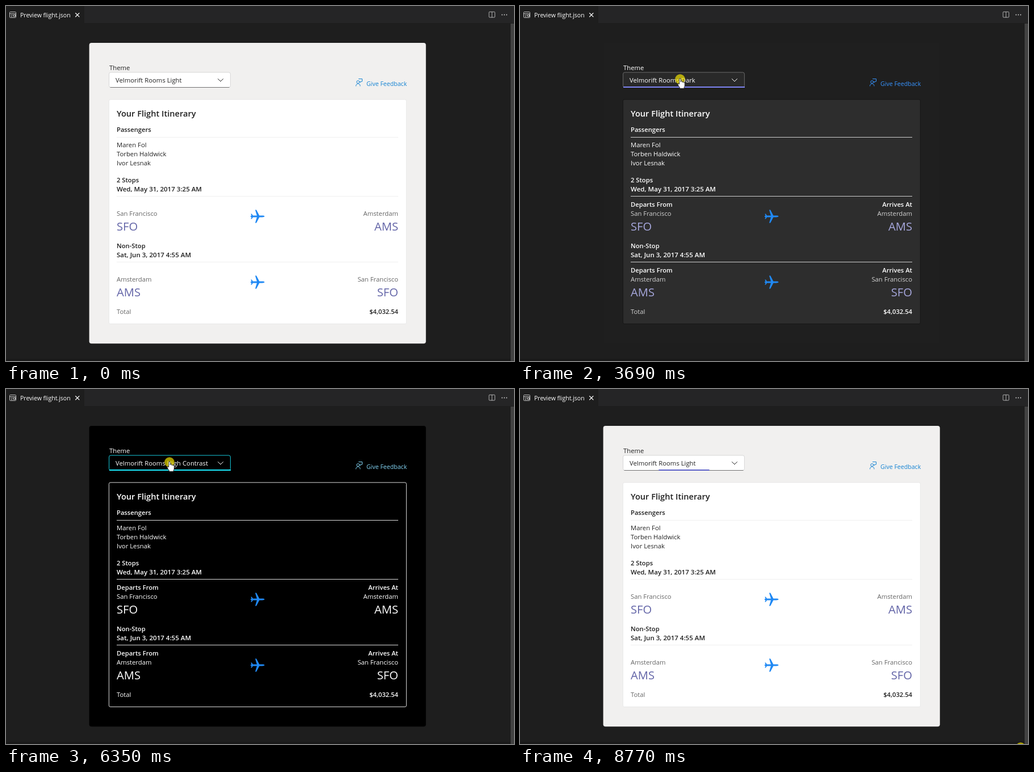
An HTML page for the animation above (8.82 s loop, 895 px wide and 626 px high).

```html
<!DOCTYPE html>
<html lang="en">
<head>
<meta charset="utf-8">
<title>Card preview</title>
<style>
  html, body { margin: 0; width: 100%; height: 100%; overflow: hidden; background: #1e1e1e; }
  svg { display: block; font-family: "Open Sans", "Noto Sans", sans-serif; font-size: 11.3px; }
  .light {
    --panel: #f1f0ef; --card: #fff; --edge: #e6e6e6; --text: #242424; --bold: #1f1f1f; --subtle: #666;
    --label: #fff; --accent: #6264a7; --rule: #ededed; --link: #1583d3; --field: #fff; --border: #d1d1d1;
    --base: #616161; --over: #b3b3b3; --focus: #5b5fc7; --list: #fff; --listEdge: #eee;
    --item: #f5f5f5; --press: #e0e0e0; --itemText: #242424;
  }
  .dark {
    --panel: #1f1f1f; --card: #2d2d2d; --edge: #141414; --text: #fff; --bold: #fff; --subtle: #d2d2d2;
    --label: #fff; --accent: #a6a7dc; --rule: #e8e8e8; --link: #3794ff; --field: #292929; --border: #666;
    --base: #adadad; --over: #757575; --focus: #7f85f5; --list: #292929; --listEdge: #333;
    --item: #3d3d3d; --press: #1f1f1f; --itemText: #fff;
  }
  .contrast {
    --panel: #000; --card: #000; --edge: #fff; --text: #fff; --bold: #fff; --subtle: #fff;
    --label: #fff; --accent: #fff; --rule: #fff; --link: #83d5f5; --field: #000; --border: #fff;
    --base: #fff; --over: #1aebff; --focus: #1aebff; --list: #000; --listEdge: #fff;
    --item: #1aebff; --press: #1aebff; --itemText: #000;
  }
  .text { fill: var(--text); font-weight: 450; }
  .bold { fill: var(--bold); font-weight: 600; font-size: 11.2px; }
  .date { fill: var(--bold); font-weight: 600; font-size: 11.55px; }
  .title { fill: var(--bold); font-weight: 600; font-size: 14.6px; }
  .label { fill: var(--label); font-weight: 600; font-size: 11.2px; }
  .subtle { fill: var(--subtle); font-weight: 450; }
  .item { font-weight: 450; }
  .code { fill: var(--accent); font-size: 20.2px; }
  .link { fill: var(--link); font-size: 10.6px; }
  .tab { fill: #fff; font-size: 10.5px; }
  .line { fill: none; stroke-linecap: round; stroke-linejoin: round; }
  .thin, #field, #base { stroke-width: .86; }
  #field { fill: var(--field); stroke: var(--border); }
  #base { stroke: var(--base); }
  .hover #field, .contrast.hover #base { stroke: var(--over); }
  #list { filter: drop-shadow(0 5px 7px rgba(0, 0, 0, .22)); }
</style>
</head>
<body>
<svg id="stage" width="895" height="626" viewBox="0 0 895 626" class="light"></svg>
<script>
const LOOP = 8820;
const THEMES = ['light', 'dark', 'contrast'];
const NAMES = ['Light', 'Dark', 'High Contrast'].map(n => 'Velmorift Rooms ' + n);
const ITEM_TOP = 148, ITEM_STEP = 30, ITEM_HEIGHT = 27;

// Bursts of motion: start, end, number of steps.
const BURSTS = [
  [0, 0, 1], [330, 1210, 13], [1280, 1480, 4], [1740, 2600, 13], [2730, 2730, 1], [2880, 3690, 13],
  [3820, 4420, 9], [4750, 5280, 8], [5820, 6680, 13], [6740, 7610, 13], [7680, 8490, 12], [8690, 8770, 2]
];
// Pointer path: time, x, y.
const PATH = [
  [330, 779, 606], [1210, 267, 123], [1280, 266, 106], [1480, 269, 123], [1870, 269, 123],
  [2600, 271, 193], [2930, 271, 193], [3690, 282, 129], [3860, 282, 129], [4420, 288, 227],
  [5820, 288, 227], [6320, 288, 129], [6460, 288, 129], [6960, 275, 162], [7175, 275, 162],
  [7610, 706, 425], [8490, 882, 632]
];
const SELECTED = [[0, 0], [2930, 1], [4820, 2], [7100, 0]];
const OPEN = [[1810, 2930], [3820, 4820], [6460, 7100]];
const CLICKS = [[1740, 1870], [2730, 2880], [3690, 3860], [4750, 4820], [6320, 6460], [6960, 7090], [8690, 8820]];
const ITEM_HELD = [[2730, 2930], [4750, 4820], [6960, 7100]];
// Underline: grow start and end, shrink start and end.
const UNDERLINE = [[2930, 3130, 3800, 3880], [4819, 5019, 6455, 6530], [7180, 7380, 8700, 8820]];

const text = (cls, x, y, s, end) =>
  `<text class="${cls}" x="${x}" y="${y}"${end ? ' text-anchor="end"' : ''}>${s}</text>`;
const rect = (x, y, w, h, attrs) => `<rect x="${x}" y="${y}" width="${w}" height="${h}" ${attrs}/>`;
const line = (d, stroke, width = 1) =>
  `<path class="line" d="${d}" stroke="${stroke}" stroke-width="${width}"/>`;
const rule = y => `<path class="thin" d="M195 ${y}H691" stroke="var(--rule)"/>`;

function plane(y) {
  const half = 'M12.5 0C12.5 .9 10.5 1.400 8.500 1.400H3.400L-1.800 11.500H-4L-1 1.400H-8L-10 4.600H-11.600L-10.400 1H-12V0Z';
  return `<g transform="translate(443 ${y})" fill="#2089f4"><path d="${half}"/>
    <path d="${half}" transform="scale(1 -1)"/></g>`;
}

function flight(y, stops, date, from, to) {
  return text('bold', 195, y, stops) + text('date', 195, y + 16, date) + rule(y + 24.5) +
    text('label', 195, y + 43, 'Departs From') + text('label', 691, y + 43, 'Arrives At', true) +
    text('subtle', 195, y + 59, from[0]) + text('subtle', 691, y + 59, to[0], true) +
    text('code', 195, y + 84.5, from[1]) + text('code', 691, y + 84.5, to[1], true) + plane(y + 60);
}

function windowBar() {
  const grey = '#c5c5c5';
  return rect(0, 0, 895, 626, 'fill="#1e1e1e"') + rect(138, 0, 757, 30, 'fill="#252526"') +
    rect(6.5, 10.5, 11, 10, `rx="1" fill="none" stroke="${grey}"`) +
    line('M7 13.5H17M9 16H12M9 18.5H11', grey) + rect(13.5, 15.5, 3, 3, `fill="none" stroke="${grey}"`) +
    text('tab', 25, 20, 'Preview flight.json') + line('M122.5 12.5l6.5 6.5m0-6.5l-6.5 6.5', '#fff', 1.1) +
    rect(851, 10.3, 10.3, 9.7, `class="thin" rx="1" fill="none" stroke="${grey}"`) +
    line('M856.2 10.5V20', grey, .86) +
    [874, 878, 882].map(x => `<circle cx="${x}" cy="15.5" r="1" fill="${grey}"/>`).join('') +
    rect(889, 31, 6, 595, 'fill="#424242"') + rect(0, 622, 889, 4, 'fill="#191919"');
}

function feedback() {
  return '<g transform="translate(0 -1)">' + line('M616.5 142c0-5.500 7.500-5.500 7.500 0', 'var(--link)') +
    '<circle cx="620.200" cy="135" r="2.400" fill="none" stroke="var(--link)"/>' +
    line('M621.500 129.500h6v4.500h-1.500l-2 2v-2', 'var(--link)') + '</g>' +
    text('link', 635, 141, 'Give Feedback');
}

function card() {
  const sfo = ['San Francisco', 'SFO'], ams = ['Amsterdam', 'AMS'];
  return rect(146.6, 65, 593.2, 530.2, 'rx="4" fill="var(--panel)"') +
    rect(181.4, 164.9, 524, 395.6, 'class="thin" rx="2.5" fill="var(--card)" stroke="var(--edge)"') +
    feedback() +
    text('title', 195, 195, 'Your Flight Itinerary') + text('bold', 195, 222, 'Passengers') + rule(231.5) +
    ['Maren Fol', 'Torben Haldwick', 'Ivor Lesnak'].map((n, i) => text('text', 195, 249 + 16 * i, n)).join('') +
    flight(311, '2 Stops', 'Wed, May 31, 2017 3:25 AM', sfo, ams) +
    flight(427, 'Non-Stop', 'Sat, Jun 3, 2017 4:55 AM', ams, sfo) +
    text('subtle', 195, 543, 'Total') + text('bold', 691, 543, '$4,032.54', true);
}

function dropdown() {
  return text('text', 182, 113, 'Theme') +
    rect(181.6, 117, 213.8, 26.5, 'id="field" rx="3"') +
    '<path id="base" d="M183.5 143.500H393.5"/>' +
    rect(182, 142, 214, 2, 'id="focus" fill="var(--focus)"') +
    '<text id="value" class="text" x="193" y="135"></text>' +
    line('M373.5 128.500l4.500 4.500 4.500-4.500', 'var(--text)') +
    '<g id="list">' + rect(182, 145, 214, 93, 'rx="3" fill="var(--list)" stroke="var(--listEdge)" stroke-width=".6"') +
    rect(186, 0, 206, ITEM_HEIGHT, 'id="mark" rx="3"') +
    NAMES.map((n, i) => text('item', 210, 166 + 29.5 * i, n)).join('') +
    '<path id="check" class="line" d="M193 162l3 3 6.500-7" stroke-width="1.300"/></g>';
}

const pointer = `<circle id="click" r="8.700" fill="#ffee00" fill-opacity=".65"/>
  <g id="pointer" stroke-linejoin="round">
    <path id="arrow" d="M0 0V12.500L2.900 9.800 4.900 14.300 6.900 13.400 5 9.100H9Z" fill="#fff" stroke="#222" stroke-width=".9"/>
    <path id="hand" d="M-1.300 9V0C-1.300-1.700 1.300-1.700 1.300 0V5C2-.2 3.900 4.200 3.900 5.500 4.500 4.500 6 4.800 6.200 6 7 5.200 8.300 5.800 8.300 7V11C8.300 13 7 14 7 16.300H-.3C-.3 14-3.600 11.500-3.900 9.200-4 7.600-2.200 7.600-1.300 9Z"
      fill="#fff" stroke="#222" stroke-width=".9"/>
  </g>`;

const stage = document.getElementById('stage');
stage.innerHTML = windowBar() + card() + dropdown() + pointer;
const $ = id => document.getElementById(id);
const items = [...document.querySelectorAll('.item')];
const show = (el, on) => el.setAttribute('visibility', on ? 'visible' : 'hidden');
const within = (spans, t) => spans.some(([a, b]) => t >= a && t < b);
const latest = (table, t) => table.filter(row => row[0] <= t).pop();
const clamp = v => Math.max(0, Math.min(1, v));

function stepped(t) {
  const [start, end, steps] = latest(BURSTS, t);
  if (t >= end) return end;
  const step = (end - start) / (steps - 1);
  return start + Math.floor((t - start) / step) * step;
}

function pointerAt(t) {
  const i = PATH.findIndex(p => p[0] > t);
  if (i < 0) return PATH[PATH.length - 1].slice(1);
  if (i === 0) return PATH[0].slice(1);
  const [t0, x0, y0] = PATH[i - 1], [t1, x1, y1] = PATH[i];
  const k = (t - t0) / (t1 - t0), e = k * k * (3 - 2 * k);
  return [x0 + (x1 - x0) * e, y0 + (y1 - y0) * e];
}

function draw(clock) {
  const t = stepped(clock % LOOP);
  const selected = latest(SELECTED, t)[1];
  const open = within(OPEN, t);
  const [x, y] = pointerAt(t);
  const inColumn = x >= 182 && x <= 396;
  const overField = t >= 330 && inColumn && y >= 117 && y <= 144;
  const overList = open && inColumn && y > 145 && y < 238;
  const hovered = overList ? Math.min(2, Math.floor((y - ITEM_TOP) / ITEM_STEP)) : -1;

  stage.setAttribute('class', THEMES[selected] + (overField ? ' hover' : ''));
  $('value').textContent = NAMES[selected];

  const grown = UNDERLINE.reduce((sum, [a, b, c, d]) =>
    sum + clamp((t - a) / (b - a)) - clamp((t - c) / (d - c)), 0);
  $('focus').setAttribute('x', 289 - 107 * grown);
  $('focus').setAttribute('width', 214 * grown);

  $('list').style.display = open ? '' : 'none';
  $('mark').style.display = hovered >= 0 ? '' : 'none';
  $('mark').setAttribute('y', ITEM_TOP + ITEM_STEP * Math.max(0, hovered));
  $('mark').style.fill = within(ITEM_HELD, t) ? 'var(--press)' : 'var(--item)';
  const ink = i => i === hovered ? 'var(--itemText)' : 'var(--text)';
  items.forEach((el, i) => { el.style.fill = ink(i); });
  $('check').style.stroke = ink(selected);
  $('check').setAttribute('transform', `translate(0 ${29.5 * selected})`);

  const hand = overField || overList || (t >= 1280 && t < 1740);
  const place = `translate(${x} ${y})`;
  $('pointer').setAttribute('transform', place);
  $('click').setAttribute('transform', place);
  show($('arrow'), t >= 330 && !hand);
  show($('hand'), hand);
  show($('click'), within(CLICKS, t));
}

const begin = performance.now();
function tick() {
  draw(performance.now() - begin);
  requestAnimationFrame(tick);
}
tick();
</script>
</body>
</html>
```
